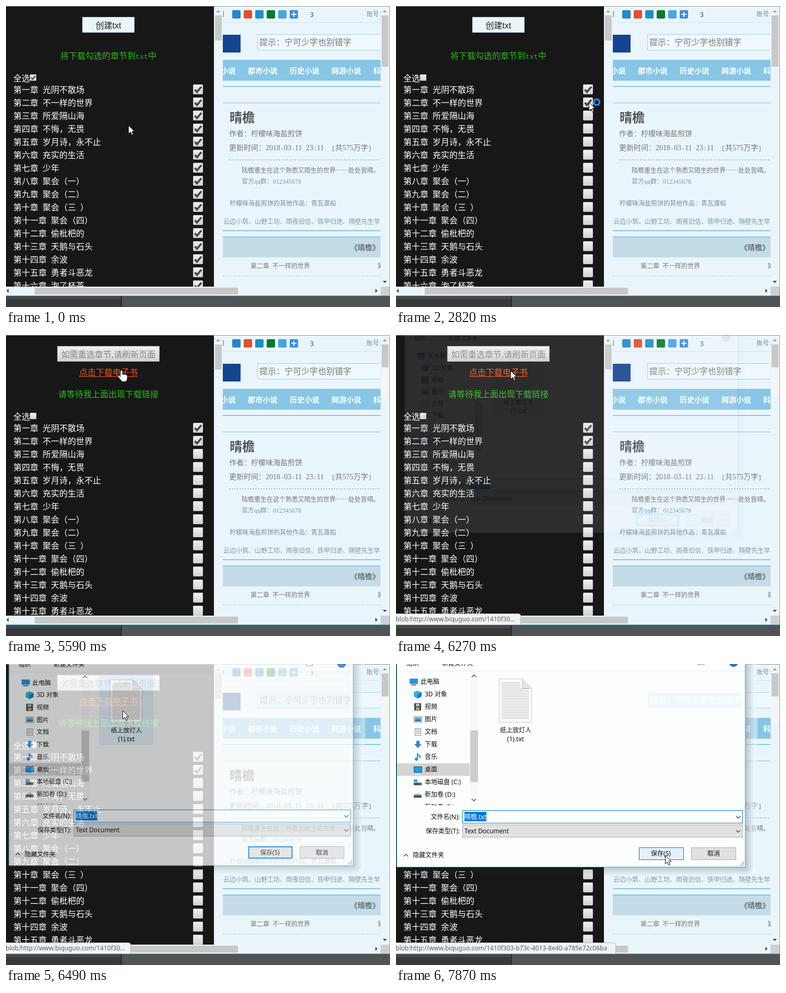
An HTML page that plays this animation: 735 by 576 pixels, repeating every 8 s.

```html
<!DOCTYPE html>
<html lang="zh">
<head>
<meta charset="utf-8">
<title>章节下载</title>
<style>
  html, body { margin: 0; width: 100%; height: 100%; overflow: hidden; background: #515457; }
  svg { display: block; }
  text { white-space: pre; font-family: "Noto Sans", "Noto Sans CJK SC", "Noto Sans CJK", sans-serif; }
  .cjk { font-family: "Noto Sans CJK SC", "Noto Sans CJK", sans-serif; }
  .half { font-family: "Liberation Mono", monospace; }
  .digits { font-family: "Liberation Serif", serif; }
  .ui { font-family: "Liberation Sans", "Noto Sans CJK SC", "Noto Sans CJK", sans-serif; }
</style>
</head>
<body>
<svg id="stage" width="735" height="576" viewBox="0 0 735 576"></svg>
<script>
const LOOP = 8000;
const SKY = '#88c6e5', PAGE = '#eaf5fb', THUMB = '#c8c8c8';
const BOOK = '晴檐';

const rect = (x, y, w, h, fill, extra = '') =>
  `<rect x="${x}" y="${y}" width="${w}" height="${h}" fill="${fill}" ${extra}/>`;
const frame = (x, y, w, h, fill, stroke, extra = '') =>
  rect(x + .5, y + .5, w - 1, h - 1, fill, `stroke="${stroke}" ${extra}`);
const path = (d, stroke, width = 1, extra = '') =>
  `<path d="${d}" fill="none" stroke="${stroke}" stroke-width="${width}" ${extra}/>`;
const label = (x, y, str, size = 12, fill = '#111', extra = '') =>
  `<text x="${x}" y="${y}" font-size="${size}" fill="${fill}" ${extra}>${str}</text>`;
const group = (id, body, extra = '') => `<g id="${id}" ${extra}>${body}</g>`;
const chevron = (x, y, up, size = 4) =>
  path(`M${x - size} ${y + (up ? 2 : -2)}l${size} ${up ? -size : size}l${size} ${up ? size : -size}`, '#444', 1.3);
const arrowHead = (x, y, dx, dy, fill) =>
  `<path d="M${x + dx * 2} ${y + dy * 2}L${x - dx * 2 + dy * 4} ${y - dy * 2 + dx * 4}L${x - dx * 2 - dy * 4} ${y - dy * 2 - dx * 4}Z" fill="${fill}"/>`;

// Full-width characters take one em, ASCII half an em.
function grid(x, y, str, size, fill, extra = '') {
  const spans = str.match(/\d+|[ -/:-~]+|[^ -~]+/g).map(run => {
    const kind = /^\d/.test(run) ? 'digits' : run < '\x7f' ? 'half' : 'cjk';
    const span = `<tspan x="${x}" class="${kind}" font-size="${kind === 'half' ? size / 1.2 : size}">${run}</tspan>`;
    x += run.length * size * (kind === 'cjk' ? 1 : .5);
    return span;
  });
  return `<text y="${y}" fill="${fill}" ${extra}>${spans.join('')}</text>`;
}

function webPage() {
  const icons = ['#2a86c8', '#e0502c', '#1f8fc4', '#0b7a2e', '#4aa5df', '#3d8ddd'];
  const nav = ['玄幻小说', '都市小说', '历史小说', '网游小说', '科幻小说'];
  return rect(398, 0, 337, 555, PAGE)
    + label(407, 20, '目', 12, '#777')
    + icons.map((c, i) => rect(433 + i * 22, 8, 16, 16, c, 'rx="2"')).join('')
    + path('M551 11v10M546 16h10', '#fff', 2)
    + label(582, 21, '3', 12, '#444') + grid(690, 20, '账号：', 12, '#888')
    + path('M415 31.5H717', '#cfe2ec')
    + rect(415, 55, 34, 34, '#15458f')
    + frame(481, 54, 260, 31, '#eff8fc', '#a3cfe3')
    + label(485, 75, '提示：宁可少字也别错字', 16, '#777', 'class="ui"')
    + rect(415, 103, 302, 40, SKY)
    + nav.map((s, i) => grid(383 + i * 80, 129, s, 14.2, '#fff', 'font-weight="700"')).join('')
    + rect(415, 153, 302, 2, SKY) + path('M415 185.5H717', '#a5b5bd')
    + grid(428, 222, BOOK, 24, '#505356', 'font-weight="700"')
    + grid(427, 249, '作者：柠檬味海盐煎饼', 14, '#777')
    + grid(427, 276, '更新时间：2018-03-11 23:11  [共575万字]', 14, '#777')
    + path('M427 294.5H717', '#999', 1, 'stroke-dasharray="3 2"')
    + grid(451, 319, '陆檐重生在这个熟悉又陌生的世界……处处皆晴。', 12, '#777')
    + grid(451, 340, '官方qq群：012345678', 12, '#7795ac')
    + grid(428, 382, '柠檬味海盐煎饼的其他作品：青瓦渡船', 12, '#7d8b97')
    + grid(416, 417, '云边小筑、山野工坊、雨夜旧信、铁甲归途、隔壁先生早', 12, '#8296a8')
    + rect(415, 429, 302, 2, SKY) + rect(415, 441, 302, 40, '#c4dce8') + rect(415, 441, 302, 2, SKY)
    + grid(659, 467, `《${BOOK}》`, 14, '#444')
    + grid(468, 502, '第二章 不一样的世界', 12, '#777') + grid(711, 502, '第', 12, '#777')
    + path('M415 516.5H717', '#b5bfc4', 1, 'stroke-dasharray="3 2"');
}

const chapters = ['光阴不散场', '不一样的世界', '所爱隔山海', '不悔，无畏', '岁月诗，永不止', '充实的生活',
  '少年', '聚会（一）', '聚会（二）', '聚会（三 ）', '聚会（四）', '偷枇杷的', '天鹅与石头', '余波', '勇者斗恶龙', '泡了杯茶'];
const numerals = '一二三四五六七八九十';
const ordinal = n => (n > 10 ? '十' : '') + numerals[(n - 1) % 10];

function chapterRow(title, i) {
  const y = 150 + i * 25;
  return grid(14, y + 16, `第${ordinal(i + 1)}章 ${title}`, 16, '#fff')
    + frame(358, y, 19, 19, 'url(#box)', '#c6c6c6', 'rx="1"')
    + path(`M361.5 ${y + 10}l4 4.5l8.5 -10`, '#454545', 3.6, `id="tick${i}"`);
}

function leftPanel() {
  return rect(0, 0, 398, 537, '#171717') + rect(0, 0, 735, 1, '#8d9499')
    + group('create', frame(146, 21, 100, 30, '#eaf5fb', '#c3d5df') + label(196, 43, '创建txt', 16, '#222', 'class="ui" text-anchor="middle"'))
    + group('refresh', frame(98, 21, 196, 30, 'url(#box)', '#a9a9a9') + label(196, 43, '如需重选章节,请刷新页面', 16, '#858585', 'class="ui" text-anchor="middle"'))
    + group('link', grid(140, 77, '点击下载电子书', 16, 'currentColor') + path('M140 79.5h112', 'currentColor'))
    + group('list',
        group('hint', grid(104, 101, '将下载勾选的章节到txt中', 16, '#2cbb1a'))
        + group('wait', grid(100, 101, '请等待我上面出现下载链接', 16, '#2cbb1a'))
        + grid(14, 144, '全选', 16, '#fff')
        + rect(46, 131, 12, 12, 'url(#box)', 'rx="1"') + path('M48 137l3 3l5.5 -6.5', '#454545', 2.4, 'id="tickAll"')
        + chapters.map(chapterRow).join(''));
}

function windowChrome() {
  return rect(398, 1, 17, 536, PAGE) + rect(400, 18, 13, 48, THUMB) + arrowHead(406, 10, 0, -1, '#999')
    + rect(717, 1, 17, 536, PAGE) + rect(719, 18, 13, 98, '#f3f6f7')
    + rect(719, 18, 13, 98, THUMB, 'id="thumb"')
    + arrowHead(725, 10, 0, -1, '#999') + arrowHead(725, 528, 0, 1, '#444')
    + rect(0, 537, 717, 17, PAGE) + rect(55, 539, 389, 13, THUMB)
    + arrowHead(3, 545, -1, 0, '#444') + arrowHead(709, 545, 1, 0, '#444')
    + rect(717, 537, 17, 17, '#cdd1d3')
    + rect(734, 0, 1, 555, '#4fb2cb') + rect(0, 554, 735, 1, '#4fb2cb')
    + rect(0, 555, 735, 21, '#515457') + rect(0, 555, 221, 21, '#37393c') + rect(0, 555, 221, 6, '#45484b')
    + rect(220, 555, 2, 21, '#292b2d');
}

function statusBar() {
  return group('status', `<path id="statusBox" fill="#f0f3f5" stroke="#b8bcbf"/>`
    + `<text id="url" x="-1" y="548" font-size="12" fill="#5b5d60"></text>`);
}

function sideIcon(i, y) {
  const x = 34;
  return [
    () => rect(26, y - 6, 16, 10, '#2196e0') + rect(29, y + 5, 10, 2, '#667'),
    () => `<path d="M${x} ${y - 4}l7 -3l8 3v8l-8 4l-7 -4Z" fill="#2fb3dc"/><path d="M${x + 7} ${y}l8 -4v8l-8 4Z" fill="#1580ac"/>`,
    () => rect(x + 1, y - 7, 13, 14, '#444') + rect(x + 4, y - 6, 7, 5, '#9cc7e4') + rect(x + 4, y + 1, 7, 5, '#d3a055'),
    () => frame(x, y - 6, 16, 12, '#fff', '#888') + rect(x + 2, y - 4, 12, 4, '#55aee6') + rect(x + 2, y, 12, 4, '#3a7ba2'),
    () => frame(x + 2, y - 7, 12, 14, '#fff', '#888') + path(`M${x + 4} ${y - 3.5}h8m-8 3h8m-8 3h8`, '#6c8ba0'),
    () => `<path d="M${x + 5} ${y - 7}h6v6h4l-7 8l-7 -8h4Z" fill="#2b84d6"/>`,
    () => path(`M${x + 7} ${y + 4}v-11q1 4 5 5v4`, '#1e90e0', 2) + `<circle cx="${x + 5}" cy="${y + 4}" r="3" fill="#1e90e0"/>`,
    () => frame(x, y - 6, 16, 12, '#1e9be8', '#15517e'),
    () => rect(x, y + 1, 15, 5, '#555') + rect(x, y - 5, 7, 5, '#28a8ea') + rect(x + 11, y + 3, 2, 1, '#6f6'),
    () => `<path d="M${x + 3} ${y - 2}h9l3 4h-15Z" fill="#bbb"/>` + rect(x, y + 1, 15, 5, '#555'),
    () => ''
  ][i]();
}

function saveDialog() {
  const places = ['此电脑', '3D 对象', '视频', '图片', '文档', '下载', '音乐', '桌面', '本地磁盘 (C:)', '新加卷 (D:)', '新加卷 (E:)'];
  const dropdown = (y, fill, stroke) => frame(127, y, 537, 25, fill, stroke) + chevron(655, y + 13, false);
  const shadow = [3, 6, 10, 14].map(d => rect(1 - d, -40, 668 + 2 * d, 429 + d, '#123', `rx="${d}" opacity=".06"`)).join('');
  return group('dialog',
    rect(398, -20, 294, 422, '#eef7fc', 'rx="14" opacity=".5"') + shadow
    + frame(1, -30, 668, 419, '#fcfdfd', '#42a9cf')
    + label(20, 3, '组织') + label(88, 3, '新建文件夹') + path('M2 13.5H668', '#e8ecee')
    + frame(577, -8, 13, 10, '#fff', '#999') + `<circle cx="646" cy="-3" r="8.5" fill="#1f6fc0"/>` + label(643, 1, '?', 10, '#fff')
    + rect(482, 55, 179, 29, '#eff8fc') + label(485, 75, '提示：宁可少字也别错字', 16, '#fff', 'class="ui" font-weight="700"')
    + rect(2, 190, 139, 24, '#d4d4d4')
    + places.map((s, i) => sideIcon(i, 34 + i * 24) + label(i ? 55 : 47, 38 + i * 24, s)).join('')
    + rect(2, 270, 139, 10, '#fcfdfd')
    + rect(142, 14, 15, 256, '#f8f9f9') + rect(142, 127, 15, 99, '#cdcdcd') + chevron(149, 23, true) + chevron(149, 260, false)
    + rect(176, 20, 105, 135, '#e3f2fd', 'id="fileHover"')
    + `<path d="M197.500 28.500h44l18 18v65h-62Z" fill="#fff" stroke="#c4c4c4"/><path d="M241.500 28.500v18h18Z" fill="#e4e4e4" stroke="#c4c4c4"/>`
    + Array.from({ length: 24 }, (_, i) => path(`M202 ${35.5 + i * 3}H${i < 4 ? 238 : 255}`, '#b9b9b9')).join('')
    + label(229, 131, '纸上放灯人', 12, '#111', 'text-anchor="middle"') + label(229, 148, '(1).txt', 12, '#111', 'text-anchor="middle"')
    + label(122, 297, '文件名(N):', 12, '#111', 'text-anchor="end"') + label(122, 324, '保存类型(T):', 12, '#111', 'text-anchor="end"')
    + dropdown(280, '#fff', '#0078d7') + rect(131, 283, 42, 18, '#0078d7') + label(131, 297, BOOK + '.txt', 12, '#fff')
    + rect(172, 283, 1, 18, '#f08a28', 'id="caret"')
    + dropdown(307, '#e1e1e1', '#adadad') + label(131, 324, 'Text Document')
    + chevron(19, 366, true) + label(32, 370, '隐藏文件夹')
    + `<rect id="save" stroke="#0078d7"/>`
    + label(507, 367, '保存(S)', 12, '#111', 'text-anchor="middle"')
    + frame(565, 351, 86, 24, '#e1e1e1', '#adadad') + label(608, 367, '取消', 12, '#111', 'text-anchor="middle"')
    + path('M658 385h2m1 0h2m1 0h2m-5 -3h2m1 0h2m-2 -3h2', '#aaa', 2), 'font-weight="500"');
}

function pointers() {
  return group('cursor',
    group('arrow', `<path d="M.5 .5v16l4 -3.500l2.500 6l2.500 -1l-2.500 -6h5Z" fill="#fff" stroke="#111"/>`)
    + group('ring', `<circle cx="15" cy="0" r="5.500" fill="none" stroke="#1f8ae6" stroke-width="3.500"/>`)
    + group('beam', path('M-3 -7.500h2.500l.5 .5l.5 -.5h2.500M0 -7v14M-3 7.500h2.500l.5 -.5l.5 .5h2.500', '#fff', 1.2))
    + group('hand', `<path d="M0 1q2 -3 4 0v7q2 -2 3.500 0q2 -1.500 3 .5q2.500 -1 2.500 1.500v5q0 3 -2.500 6h-8q-1 -3 -7 -9q-1 -3 2 -2l2.500 2Z" fill="#fff" stroke="#222" stroke-width=".7"/>`));
}

const stage = document.getElementById('stage');
stage.innerHTML = `<defs><linearGradient id="box" x2="0" y2="1"><stop stop-color="#f0f0f0"/><stop offset="1" stop-color="#d2d2d2"/></linearGradient></defs>`
  + webPage() + leftPanel() + windowChrome() + statusBar() + saveDialog() + pointers();
const $ = id => document.getElementById(id);
const show = (id, on) => $(id).setAttribute('display', on ? 'inline' : 'none');
const attrs = (id, values) => Object.entries(values).forEach(([k, v]) => $(id).setAttribute(k, v));
const clamp = v => Math.max(0, Math.min(1, v));

// Pointer stops: time, x, y.
const stops = [[60, 234, 228], [220, 150, 90], [340, 60, 140], [520, 130, 385], [800, 172, 182], [880, 172, 182],
  [1260, 52, 137], [1410, 52, 137], [1770, 368, 157], [1990, 367, 160], [2220, 367, 160], [2680, 369, 184],
  [2820, 369, 184], [3420, 190, 38], [4110, 190, 38], [4410, 225, 115], [4470, 225, 115], [4910, 215, 148],
  [4990, 215, 148], [5590, 219, 68], [6270, 219, 68], [6430, 221, 84], [6630, 228, 102], [6700, 228, 102],
  [7060, 416, 336], [7140, 416, 336], [7500, 463, 372], [7870, 515, 366]];

function pointerAt(t) {
  const i = stops.findIndex(s => s[0] > t);
  if (i === 0) return stops[0].slice(1);
  if (i < 0) return stops[stops.length - 1].slice(1);
  const [t0, x0, y0] = stops[i - 1], [t1, x1, y1] = stops[i];
  const k = (t - t0) / (t1 - t0);
  return [x0 + (x1 - x0) * k, y0 + (y1 - y0) * k];
}

function render(t) {
  const [x, y] = pointerAt(t);
  const over = (l, top, r, b) => x >= l && x <= r && y >= top && y <= b;

  const all = t < 1410, waiting = t >= 3800, linked = t >= 4600;
  show('tickAll', all);
  chapters.forEach((_, i) => show('tick' + i, all || (i === 0 && t >= 1930) || (i === 1 && t >= 2600)));
  show('create', !waiting);
  show('refresh', waiting);
  show('hint', !waiting);
  show('wait', waiting);
  show('link', linked);
  const linkHover = linked && t > 4990 && (t > 5590 || over(140, 63, 252, 80));
  $('link').setAttribute('color', linkHover ? '#ff5014' : '#6f78a7');
  attrs('list', { transform: `translate(0 ${linked ? 18 : 0})` });
  attrs('thumb', { height: linked ? 44 : 98 });

  show('status', t >= 5740);
  const grow = clamp((t - 7200) / 200), right = 238.5 + 182 * grow;
  attrs('statusBox', { d: `M-1 533.500H${right - 4}q4 0 4 4V554.500H-1Z` });
  $('url').textContent = 'blob:http://www.biquguo.com/1410f30' + (grow === 1 ? '3-b73c-4013-8e40-a785e72c06ba' : '...');

  const open = clamp((t - 6240) / 330), scale = .95 + .05 * open;
  show('dialog', t >= 6270);
  attrs('dialog', { opacity: open, transform: `translate(345 165) scale(${scale}) translate(-345 -165)` });
  show('fileHover', over(176, 20, 281, 155));
  show('caret', (t - 6270) % 1060 < 530);
  const saveHover = over(465, 351, 551, 375), inset = saveHover ? .5 : 1;
  attrs('save', {
    x: 465 + inset, y: 351 + inset, width: 86 - 2 * inset, height: 24 - 2 * inset,
    fill: saveHover ? '#e5f1fb' : '#e1e1e1', 'stroke-width': 2 * inset
  });

  const hand = t >= 5300 && t < 6130, beam = t >= 4250 && t < 4910;
  attrs('cursor', { transform: `translate(${Math.round(x)} ${Math.round(y)})` });
  show('arrow', !hand && !beam);
  show('ring', t >= 1800 && t < 3000);
  show('beam', beam);
  show('hand', hand);
}

const start = performance.now();
function tick() {
  render((performance.now() - start) % LOOP);
  requestAnimationFrame(tick);
}
tick();
</script>
</body>
</html>
```
